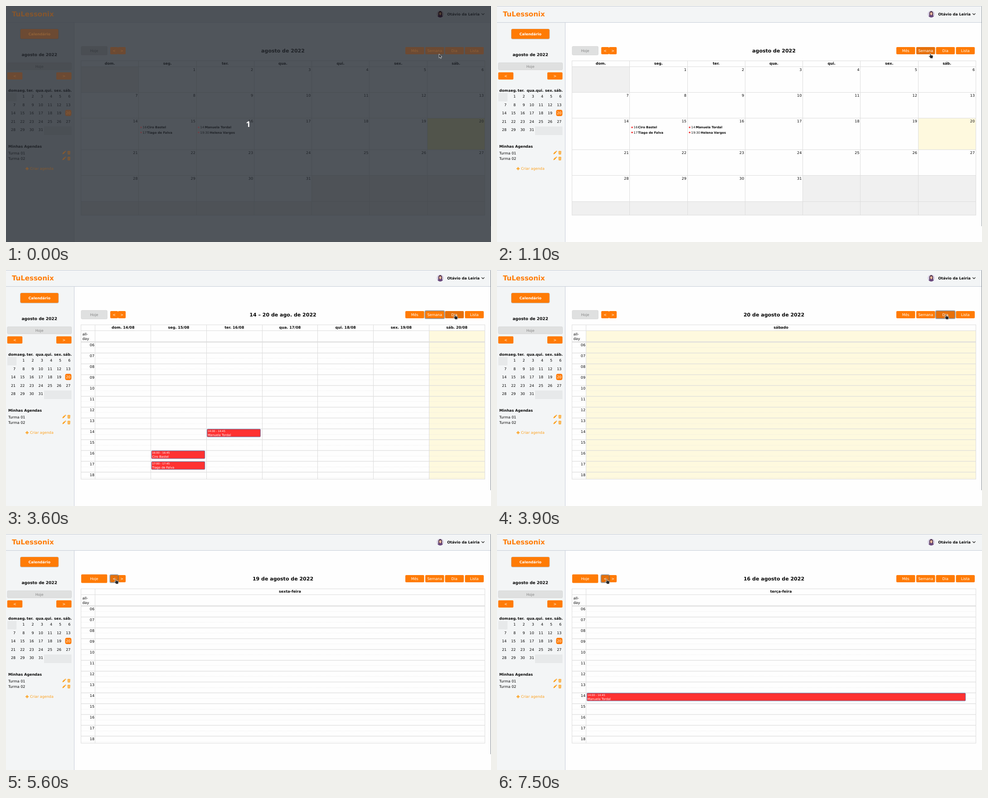
An HTML page for the animation above (8000 ms loop, 1070 by 523 pixels).

```html
<!DOCTYPE html>
<html lang="pt-BR">
<head>
<meta charset="utf-8">
<title>Agenda</title>
<style>
html, body { margin: 0; width: 100%; height: 100%; overflow: hidden; }
svg {
  display: block; width: 1070px; height: 523px;
  font: 8px "DejaVu Sans", Verdana, sans-serif;
  text-rendering: geometricPrecision;
  --bg: #fefefe; --panel: #f3f5f6; --edge: #c6cdd8; --line: #dddddd; --ink: #060606;
  --orange: #ff7b05; --hover: #e6700a; --logo: #ff7b05; --label: #fff; --amber: #fda01c;
  --off: #dfe0e0; --offline: #c9caca; --offink: #858585;
  --other: #f0f0f0; --mini: #e7e9ea; --today: #fef9de; --red: #f23434; --bar: #7f868e;
}
svg.dim {
  --bg: #50555b; --panel: #4d5258; --edge: #484d55; --line: #494e53; --ink: #1f2227;
  --orange: #6c4a33; --hover: #664632; --logo: #85562d; --label: #916238; --amber: #85592f;
  --off: #4a4e53; --offline: #484c51; --offink: #35393e;
  --other: #4e5257; --mini: #4a4f54; --today: #51544b; --red: #6d4046; --bar: #3d434b;
}
text { fill: var(--ink); white-space: pre; }
.b { font-weight: 700; }
.mid { text-anchor: middle; }
.end { text-anchor: end; }
.bg { fill: var(--bg); }
.panel { fill: var(--panel); }
.edge { fill: var(--edge); }
.line { fill: var(--line); }
.soft { fill: var(--line); opacity: .6; }
.half { stroke: var(--line); stroke-dasharray: 1 1; opacity: .5; }
.orange { fill: var(--orange); }
.hover { fill: var(--hover); }
.logo { fill: var(--logo); font-size: 15px; }
.label { fill: var(--label); }
.amber { fill: var(--amber); }
.off { fill: var(--off); stroke: var(--offline); stroke-width: .6; }
.offink { fill: var(--offink); }
.other { fill: var(--other); }
.mini { fill: var(--mini); }
.today { fill: var(--today); }
.red { fill: var(--red); }
.bar { fill: var(--bar); }
.event { fill: #ff3232; stroke: #3c6fae; stroke-width: .8; }
.small { font-size: 6.8px; }
.tiny { font-size: 5.78px; }
.shade { fill: rgba(60, 60, 60, .28); }
.ring { fill: none; stroke: rgba(76, 91, 106, .6); stroke-width: 1.8; }
.count { font: 600 17.5px "Noto Sans", "Open Sans", sans-serif; fill: #fff; }
.cursor { fill: #26282a; stroke: #fff; stroke-width: .7; stroke-linejoin: round; }
.dim .avatar { filter: brightness(.33); }
</style>
</head>
<body>
<svg id="stage" viewBox="0 0 1070 523"></svg>
<script>
const stage = document.getElementById('stage');
const LOOP = 8000;
const NAMES = { a: 'Ciro Bastel', b: 'Tiago de Falva', c: 'Manuela Tordal', d: 'Helena Vargos' };
const WEEK = ['dom.', 'seg.', 'ter.', 'qua.', 'qui.', 'sex.', 'sáb.'];
const HOUR = 24.03, TOP = 159.8;

const rect = (x, y, w, h, cls, more = '') =>
  `<rect x="${x}" y="${y}" width="${w}" height="${h}" class="${cls}" ${more}/>`;
const text = (x, y, s, cls = '', more = '') => `<text x="${x}" y="${y}" class="${cls}" ${more}>${s}</text>`;
const group = (id, body) => `<g id="${id}">${body}</g>`;
const range = (n, f) => Array.from({ length: n }, (_, i) => f(i)).join('');
const hline = (x1, x2, y, cls = 'line') => rect(x1, Math.floor(y), x2 - x1, 1, cls);
const vline = (x, y1, y2, cls = 'line') => rect(Math.floor(x), y1, 1, y2 - y1, cls);
const round = r => `rx="${r}"`;
const size = n => `style="font-size:${n}px"`;

// id: [x, y, width, height, label]
const BUTTONS = {
  prev: [230, 91, 17, 16, '&lt;'],
  next: [247, 91, 17, 16, '&gt;'],
  month: [881, 91, 41.5, 16, 'Mês'],
  week: [925, 91, 41.5, 16, 'Semana'],
  day: [968.5, 91, 41.5, 16, 'Dia'],
  list: [1012.5, 91, 41.5, 16, 'Lista'],
};

function button([x, y, w, h, label], id = '') {
  return rect(x, y, w, h, 'orange', `rx="2" id="${id}"`) +
    text(x + w / 2, y + h / 2 + 2.9, label, 'label mid');
}

function miniCalendar() {
  const col = 20.2, right = i => 3 + col * (i + 1) - 2;
  const heads = [5, 25.2, 45.6, 65.6, 85.6, 106, 126];
  let s = rect(3, 193, 20.2, 18.3, 'mini') + rect(84, 267, 60.5, 19, 'mini');
  s += range(7, i => text(heads[i], 189.5, WEEK[i], 'b'));
  s += rect(130.5, 230, 13.8, 14, 'orange', round(4));
  for (let d = 1; d <= 31; d++) {
    const row = Math.floor(d / 7);
    s += text(right(d % 7), 203.4 + row * 18.45, d, d === 20 ? 'end label' : 'end');
  }
  return s;
}

function icons(y) {
  return `<g class="amber" transform="translate(128.4 ${y})">
    <path d="M-4 3.6l.6-2.5 4-4 1.9 1.9-4 4zM1.2-3.4l.8-.7q.6-.4 1.1.1l.8.8q.5.5 0 1l-.8.8z"/>
    <path d="M6.8-3.3h2.2l.5-.8h1.6l.5.8h2.2v1H6.8zM7.3-1.8h6l-.4 5q-.1.8-.8.8H8.5q-.7 0-.8-.8z"/>
    <path d="M9-.9v3.8M10.3-.9v3.8M11.6-.9v3.8" stroke="var(--panel)" stroke-width=".5"/></g>`;
}

function shell() {
  return rect(0, 0, 1070, 523, 'bg') +
    rect(0, 0, 1070, 37, 'panel') + rect(0, 37, 150, 486, 'panel') +
    hline(0, 1070, 0, 'edge') + hline(0, 1070, 36, 'edge') + vline(150, 37, 523, 'edge') +
    text(13, 22.7, 'TuLessonix', 'b logo') +
    `<g class="avatar"><circle cx="958" cy="17.8" r="7.6" fill="#d3cae0"/>
      <path d="M954 21v-5a4 4.4 0 0 1 8 0v5z" fill="#40243a"/>
      <path d="M952.4 23q1-3.2 5.6-3.2t5.6 3.2a7.6 7.6 0 0 1-11.2 0z" fill="#6a4a7d"/>
      <ellipse cx="958" cy="17" rx="2.6" ry="3.3" fill="#e9b6a0"/></g>` +
    text(973.3, 20.9, 'Otávio da Leiria', 'b') +
    '<path d="M1049.2 16.3l3.1 3.1 3.1-3.1" fill="none" stroke="var(--ink)" stroke-width="1.1"/>' +
    rect(31, 50.6, 85.4, 23.2, 'shade', round(3.5)) +
    rect(31.8, 51, 83.8, 21.8, 'orange', round(3)) +
    text(73.7, 64.6, 'Calendário', 'b label mid') +
    text(73.7, 110.6, 'agosto de 2022', 'b mid', size(9)) +
    rect(3, 125.8, 141.5, 15.6, 'off', round(2)) + text(73.7, 136.6, 'Hoje', 'offink mid') +
    button([2.7, 147, 33.5, 16, '&lt;']) + button([111, 147, 33.5, 16, '&gt;']) +
    miniCalendar() +
    text(5, 313.8, 'Minhas Agendas', 'b') +
    text(5, 328.8, 'Turma 01') + icons(325) +
    text(5, 341.2, 'Turma 02') + icons(338) +
    '<path class="amber" d="M45.5 357h2v2.4h2.5v2h-2.5v2.4h-2v-2.4H43v-2h2.5z"/>' +
    text(53, 363.4, 'Criar agenda', 'amber');
}

function toolbar() {
  return rect(165.9, 89.4, 57.4, 19.2, 'off', 'rx="2" id="todayBox"') +
    text(194.5, 101.9, 'Hoje', 'offink mid', 'id="todayText"') +
    Object.entries(BUTTONS).map(([id, b]) => button(b, id)).join('') +
    text(611, 103, '', 'b mid', 'id="title" style="font-size:11px"') +
    rect(0, 0, 1, 1, 'ring', 'id="ring" rx="2.5"');
}

const frame = () => hline(165, 1057, 121) + hline(165, 1057, 463) + vline(165, 121, 464) + vline(1056, 121, 464);

function monthView() {
  const ys = [134, 191, 248, 318, 375, 433, 463], x = i => 165.5 + 127.25 * i;
  let s = rect(x(0), 134, 127, 57, 'other') + rect(x(4), 375, 382, 58, 'other') +
    rect(x(0), 433, 891, 30, 'other') + rect(x(6), 248, 128, 70, 'today');
  s += range(6, i => hline(165, 1057, ys[i])) + range(6, i => vline(x(i + 1), 121, 464));
  s += range(7, i => text(x(i) + 63.6, 130.4, WEEK[i], 'b mid'));
  for (let d = 1; d <= 31; d++)
    s += text(x(d % 7 + 1) - 2.2, ys[Math.floor(d / 7)] + 10.2, d, 'end');
  const entry = (ex, y, hour, name, nx) => `<circle class="red" cx="${ex}" cy="${y}" r="1.8"/>` +
    text(ex + 3.6, y + 2.4, hour, 'small') + text(nx, y + 2.4, name, 'b small');
  return s + frame() + entry(298, 269, '16', NAMES.a, 311.3) + entry(298, 280.2, '17', NAMES.b, 311.3) +
    entry(425, 269, '14', NAMES.c, 438.5) + entry(425, 280.2, '19:30', NAMES.d, 449.6);
}

function slots() {
  return hline(165, 1057, 134) + rect(166, 158, 890, 3, 'line', 'opacity=".75"') +
    range(12, i => rect(165, Math.round(TOP + HOUR * (i + 1)) - 1, 892, 2, 'soft')) +
    range(13, i => {
      const y = Math.floor(TOP + HOUR * (i + .5)) + .5;
      return `<path class="half" d="M166 ${y}H1056"/>` +
        text(195, TOP + HOUR * i + 9.1, String(i + 6).padStart(2, '0'), 'end');
    }) +
    vline(196, 121, 464) + text(168.5, 144.7, 'all-') + text(168.5, 154.7, 'day') + frame();
}

function booking(x, w, hour, name) {
  const y = TOP + HOUR * (hour - 6) + .6;
  return rect(x + .4, y, w - .8, 17.2, 'event', round(1.5)) +
    text(x + 1.6, y + 6.5, `${hour}:00 - ${hour}:45`, 'label tiny') +
    text(x + 1.6, y + 15.3, name, 'label small');
}

function weekView() {
  const x = i => 196.8 + 122.75 * i;
  return rect(x(6), 134, 1056 - x(6), 330, 'today') + slots() +
    range(6, i => vline(x(i + 1), 121, 464)) +
    range(7, i => text(x(i) + 61.4, 130.4, `${WEEK[i]} ${14 + i}/08`, 'b mid')) +
    booking(443.3, 118.4, 14, NAMES.c) + booking(320.7, 118.4, 16, NAMES.a) + booking(320.7, 118.4, 17, NAMES.b) +
    rect(1054, 241, 2, 150, 'bar', 'id="innerBar" rx="1"');
}

const dayView = () => rect(197, 134, 859, 330, 'today', 'id="todayFill"') + slots() +
  text(626.5, 130.4, '', 'b mid', 'id="weekday"') + group('dayEvent', booking(198, 836, 14, NAMES.c));

stage.innerHTML = shell() + group('monthView', monthView()) + group('weekView', weekView()) +
  group('dayView', dayView()) + toolbar() + rect(1069, 1, 1, 487, 'bar', 'id="pageBar"') +
  text(534.5, 267.6, '1', 'mid count', 'id="count"') +
  `<g id="cursor" class="cursor"><path id="arrow" d="M0 0V9.2L2.1 7.3 3.6 10.5 5.1 9.8 3.7 6.8H6.6Z"/>
   <path id="hand" d="M-1 .8Q-1-.2 0-.2T1 .8V3.4L5.2 4.2Q6.3 4.5 6.2 5.6L5.6 8.4V10.8H-.4V9.4L-3.4 6.1Q-3.8 5.2-2.8 4.9L-1 6Z"/></g>`;

const el = {};
stage.querySelectorAll('[id]').forEach(n => { if (n.id) el[n.id] = n; });

// Tables of [time, value...]; each row holds until the next.
const VIEWS = [[0, 'month'], [1800, 'week'], [3900, 'day', 20], [5600, 'day', 19], [6100, 'day', 18],
  [7000, 'day', 17], [7500, 'day', 16]];
const FOCUS = [[0, ''], [1600, 'week'], [3800, 'day'], [5300, 'prev']];
const POINTER = [[0, 955.3, 106], [100, 956, 105.2], [2500, 950, 117.6], [2600, 947, 120], [2700, 945, 121],
  [2900, 946, 121], [3000, 950, 119], [3100, 957, 115], [3200, 966, 110], [3300, 976, 105], [3400, 984, 101],
  [3500, 988, 99.2], [3600, 990.5, 98.8], [4000, 985, 100], [4100, 945, 112], [4200, 850, 130], [4300, 720, 140],
  [4400, 560, 135], [4500, 430, 118], [4600, 327, 102], [4700, 290, 102], [4800, 262, 103], [4900, 251, 102],
  [5000, 245, 100.5], [5100, 242.3, 100]];
const PAGE_BAR = [[0, 1], [1100, .8], [1200, .4], [1300, 0], [2500, .8], [2600, 1],
  [6400, .75], [6500, .5], [6600, .25], [6700, 0]];
const INNER_BAR = [[0, 1], [2900, .75], [3000, .5], [3100, .25], [3200, 0]];
const DAYS = { 20: 'sábado', 19: 'sexta-feira', 18: 'quinta-feira', 17: 'quarta-feira', 16: 'terça-feira' };
const TITLES = { month: 'agosto de 2022', week: '14 – 20 de ago. de 2022' };

const at = (table, t) => table.findLast(row => row[0] <= t).slice(1);
const show = (node, on) => { node.style.display = on ? '' : 'none'; };

function render(t) {
  const dim = t < 100;
  const [view, day] = at(VIEWS, t);
  const [focus] = at(FOCUS, t);
  const [x, y] = at(POINTER, t);

  stage.classList.toggle('dim', dim);
  show(el.count, dim);
  for (const v of ['month', 'week', 'day']) show(el[v + 'View'], v === view);
  el.title.textContent = TITLES[view] || `${day} de agosto de 2022`;
  el.weekday.textContent = DAYS[day] || '';
  show(el.todayFill, day === 20);
  show(el.dayEvent, day === 16);

  const away = day < 20;
  el.todayBox.setAttribute('class', away ? 'orange' : 'off');
  el.todayText.setAttribute('class', away ? 'label mid' : 'offink mid');

  let over = '';
  for (const [id, [bx, by, w, h]] of Object.entries(BUTTONS)) {
    const hit = !dim && x >= bx && x < bx + w && y >= by && y < by + h;
    if (hit) over = id;
    el[id].setAttribute('class', hit ? 'hover' : 'orange');
  }
  show(el.arrow, !over);
  show(el.hand, over);
  el.cursor.setAttribute('transform', `translate(${x} ${y})`);

  show(el.ring, focus);
  if (focus) {
    const [bx, by, w, h] = BUTTONS[focus];
    const box = { x: bx - .7, y: by - .7, width: w + 1.4, height: h + 1.4 };
    for (const k in box) el.ring.setAttribute(k, box[k]);
  }
  el.pageBar.style.opacity = at(PAGE_BAR, t)[0];
  el.innerBar.style.opacity = at(INNER_BAR, t)[0];
}

const start = performance.now();
function tick() {
  render((performance.now() - start) % LOOP);
  requestAnimationFrame(tick);
}
tick();
</script>
</body>
</html>
```
